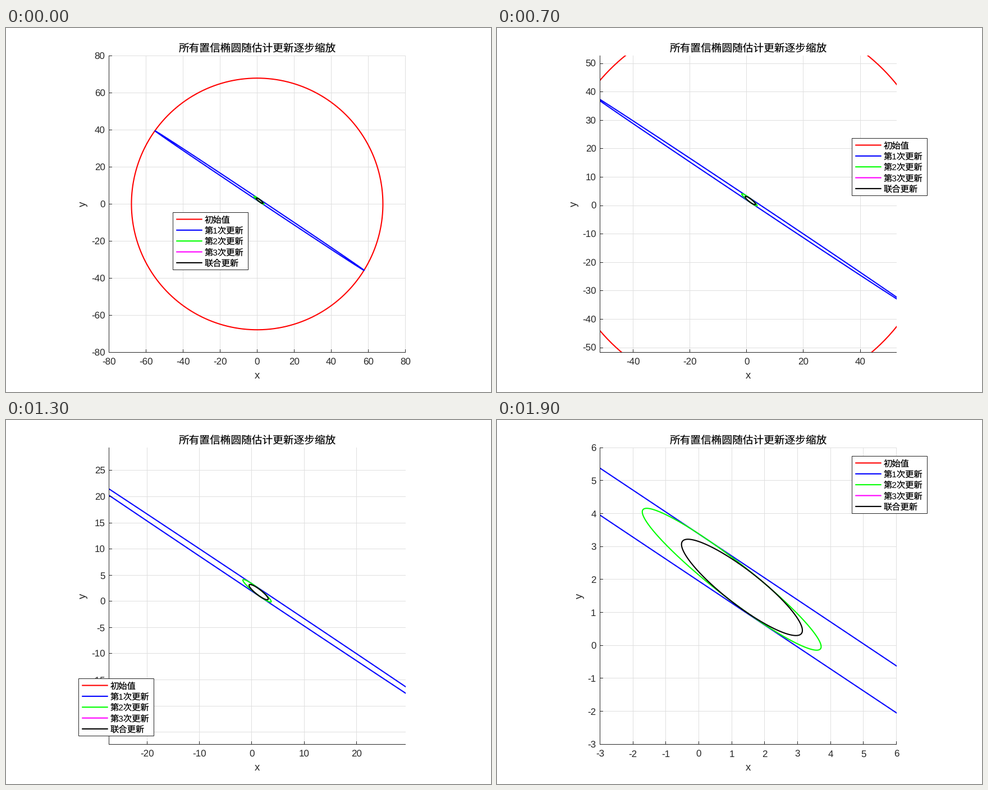
A matplotlib script for the animation above (2 s loop, 864x648 px).

```python
import math

import matplotlib.pyplot as plt
import numpy as np
from matplotlib.animation import FuncAnimation
from matplotlib.patches import Rectangle

W, H, DPI = 864, 648, 100
FRAMES, INTERVAL = 20, 100
PX = 72 / DPI  # points per pixel

plt.rcParams["font.family"] = ["Liberation Sans", "Noto Sans CJK JP"]
plt.rcParams["text.hinting"] = "none"

LEFT, TOP, SIZE = 183.4, 49.2, 528.1
RIGHT, BOTTOM = LEFT + SIZE, TOP + SIZE
MID_X, MID_Y = LEFT + SIZE / 2, TOP + SIZE / 2
INK, GRID = "#262626", "#dfdfdf"
BASE = 17.0  # tick label size in pixels
TITLE = "所有置信椭圆随估计更新逐步缩放"
ENTRIES = [("初始值", "#ff0000"), ("第1次更新", "#0000ff"),
           ("第2次更新", "#00ff00"), ("第3次更新", "#ff00ff"),
           ("联合更新", "#000000")]

# centre x, centre y, half width, half height, correlation, colour
# (the third update coincides with the joint one and stays hidden)
ELLIPSES = [
    (0, 0, 67.86, 67.86, 0, "#ff0000"),
    (1.36, 1.76, 56.5, 37.67, -math.sqrt(1 - 0.01898 ** 2), "#0000ff"),
    (1.0, 2.007, 2.715, 2.152, -0.95, "#00ff00"),
    (1.311, 1.76, 1.835, 1.461, -0.893, "#000000"),
]

fig = plt.figure(figsize=(W / DPI, H / DPI), dpi=DPI, facecolor="white")
ax = fig.add_axes([0, 0, 1, 1])


def ellipse(cx, cy, a, b, rho):
    t = np.linspace(0, 2 * np.pi, 400)
    u, v = np.cos(t), np.sin(t)
    return cx + a * u, cy + b * (rho * u + math.sqrt(1 - rho ** 2) * v)


def crisp(v):
    """Centre of the pixel that holds v."""
    return math.floor(v) + 0.5


def line(xs, ys, color, width=1.0, z=1):
    return ax.plot(xs, ys, color=color, lw=width * PX, zorder=z, snap=False,
                   solid_capstyle="butt")[0]


def vline(x, y0, y1, color, z=1):
    line([crisp(x)] * 2, [math.floor(y0), math.floor(y1) + 1], color, z=z)


def hline(y, x0, x1, color, z=1):
    line([math.floor(x0), math.floor(x1) + 1], [crisp(y)] * 2, color, z=z)


def text(x, y, s, size, color=INK, z=5, va="baseline", **kw):
    ax.text(x, y, s, fontsize=size * PX, color=color, zorder=z, va=va, **kw)


def ticks(lo, hi, min_gap):
    """Round values, at the finest step that leaves min_gap pixels."""
    scale = SIZE / (hi - lo)
    step = next(s for s in (1, 2, 5, 10, 20, 50) if s * scale >= min_gap)
    first = math.ceil(lo / step - 1e-6)
    last = math.floor(hi / step + 1e-6)
    return [k * step for k in range(first, last + 1)]


def legend_tile(i):
    """Column and row of the tile where the legend is clear of the curves."""
    if i < 7:
        return 1, 2
    if i < 10:
        return 3, 1
    if i < 14:
        return 0, 3
    return 3, 0


def draw_legend(col, row):
    x, y = crisp(129.9 + 167.4 * col), crisp(64.4 + 132 * row)
    ax.add_patch(Rectangle((x, y), 134, 102, fc="white", ec=INK,
                           lw=PX, zorder=10, snap=False))
    for k, (name, color) in enumerate(ENTRIES):
        mid = y + 12 + 19.35 * k
        line([x + 5.7, x + 52.2], [mid, mid], color, 2.1, 11)
        text(x + 56.2, mid + 5.8, name, BASE * 0.9, "black", 12)


def draw(i):
    ax.clear()
    ax.set_xlim(0, W)
    ax.set_ylim(H, 0)
    ax.axis("off")

    k = i / (FRAMES - 1)
    lo, hi = -80 + 77 * k, 80 - 74 * k
    scale = SIZE / (hi - lo)

    def to_x(v):
        return LEFT + (v - lo) * scale

    def to_y(v):
        return BOTTOM - (v - lo) * scale

    for v in ticks(lo, hi, 52):
        x = to_x(v)
        vline(x, TOP, BOTTOM, GRID)
        vline(x, BOTTOM - 5, BOTTOM, INK, 4)
        text(x, 599.9, str(v), BASE, ha="center")

    widest = 0
    for v in ticks(lo, hi, 46):
        y = to_y(v)
        hline(y, LEFT, RIGHT, GRID)
        hline(y, LEFT, LEFT + 5, INK, 4)
        text(176.6, y + 6.2, str(v), BASE, ha="right")
        digits = len(str(abs(v)))
        widest = max(widest, (0.556 * digits + 0.333 * (v < 0)) * BASE)

    frame = Rectangle((LEFT, TOP), SIZE, SIZE, fc="none", ec="none")
    ax.add_patch(frame)
    for *shape, color in ELLIPSES:
        x, y = ellipse(*shape)
        curve = line(to_x(x), to_y(y), color, 2.1, 2)
        curve.set_clip_path(frame)

    vline(LEFT, TOP, BOTTOM, INK, 4)
    hline(BOTTOM, LEFT, RIGHT, INK, 4)

    label = BASE * 1.1
    text(MID_X, 42.3, TITLE, label, "black", ha="center")
    text(MID_X, 623.5, "x", label, ha="center")
    text(176.6 - widest - 6.8, MID_Y, "y", label, rotation=90,
         ha="right", va="center")
    draw_legend(*legend_tile(i))
    return []


anim = FuncAnimation(fig, draw, frames=FRAMES, interval=INTERVAL,
                     init_func=lambda: [], repeat=True, repeat_delay=0)
plt.show()
```
